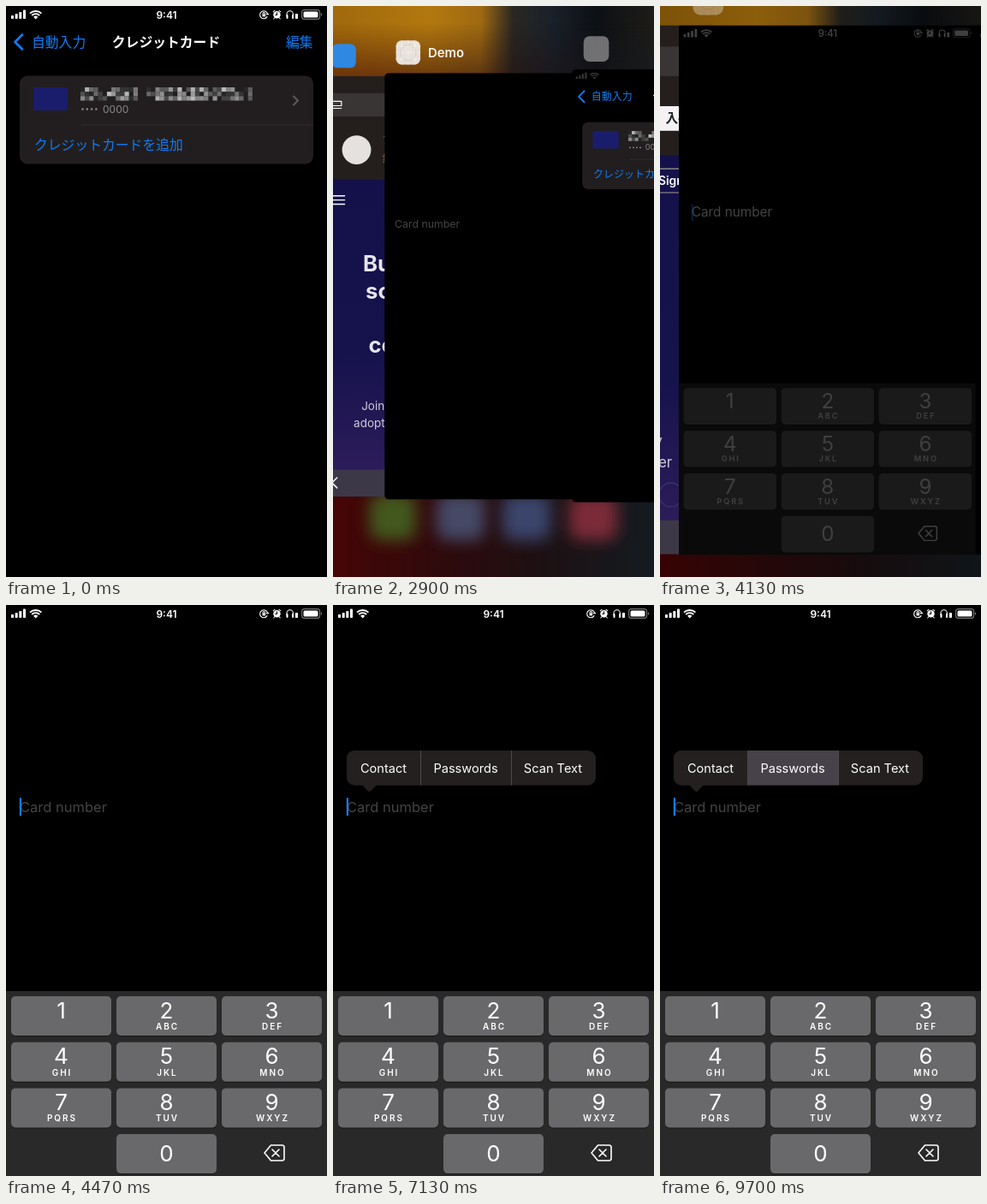
An HTML page that plays this animation: 375x667 px, repeating every 9.73 s.

```html
<!DOCTYPE html>
<html lang="ja">
<head>
<meta charset="utf-8">
<title>Card autofill</title>
<style>
  html, body { margin: 0; width: 100%; height: 100%; overflow: hidden; background: #000; }
  svg { display: block; width: 375px; height: 667px; }
  text { font-family: Inter, "Noto Sans CJK JP", "Noto Sans CJK", sans-serif; fill: #fff; }
  .mid { text-anchor: middle; }
  .jp { font-family: "Noto Sans CJK JP", "Noto Sans CJK", sans-serif; font-size: 15.8px; }
  .link { fill: #0f7cf5; }
  .digit { font-size: 26px; text-anchor: middle; }
  .abc { font-size: 10px; font-weight: 600; letter-spacing: 2px; text-anchor: middle; }
  .head { font-size: 35px; font-weight: 700; text-anchor: middle; fill: #e6e4ec; }
  .lead { font-size: 18.3px; text-anchor: middle; fill: #d0cdd8; }
  .menu text { font-size: 14.6px; text-anchor: middle; }
  .line { fill: none; stroke: #fff; stroke-linecap: round; stroke-linejoin: round; }
</style>
</head>
<body>
<svg viewBox="0 0 375 667">
  <defs>
    <linearGradient id="sky">
      <stop offset="0" stop-color="#a0690c"/><stop offset=".3" stop-color="#b2780f"/>
      <stop offset=".46" stop-color="#a06a12"/><stop offset=".56" stop-color="#2a2722"/>
      <stop offset=".68" stop-color="#1a212a"/><stop offset=".82" stop-color="#0d1014"/>
      <stop offset="1" stop-color="#1e1c19"/>
    </linearGradient>
    <linearGradient id="ground">
      <stop offset="0" stop-color="#460506"/><stop offset=".35" stop-color="#2e0a0c"/>
      <stop offset=".65" stop-color="#1d1013"/><stop offset="1" stop-color="#141b20"/>
    </linearGradient>
    <linearGradient id="fade" x2="0" y2="1">
      <stop offset=".03" stop-color="#fff" stop-opacity="0"/>
      <stop offset=".2" stop-color="#fff"/>
    </linearGradient>
    <mask id="lower"><rect width="375" height="667" fill="url(#fade)"/></mask>
    <linearGradient id="page" x2="0" y2="1">
      <stop offset="0" stop-color="#14114a"/><stop offset=".6" stop-color="#15124c"/>
      <stop offset="1" stop-color="#2c1c5a"/>
    </linearGradient>
    <filter id="blur" x="-50%" y="-50%" width="200%" height="200%"><feGaussianBlur stdDeviation="9"/></filter>
    <clipPath id="round"><rect id="corner" width="375" height="667"/></clipPath>
    <g id="status">
      <g fill="#fff">
        <rect x="6" y="11" width="3" height="4" rx=".8"/><rect x="10.7" y="9" width="3" height="6" rx=".8"/>
        <rect x="15.3" y="7" width="3" height="8" rx=".8"/><rect x="20" y="4.6" width="3" height="10.4" rx=".8"/>
        <path d="M34.7 15.4l-2.6-2.7a3.7 3.7 0 0 1 5.2 0z"/>
        <circle cx="316.500" cy="10.300" r="4.200"/>
        <rect x="338" y="9" width="3" height="6" rx=".8"/>
        <rect x="347.500" y="6.500" width="17" height="7" rx="1.600"/>
        <path d="M368.300 8.300q1.600 1.700 0 3.400z"/>
      </g>
      <g class="line" stroke-width="1.900" style="stroke-linecap:butt">
        <path d="M28 8.700a9.500 9.500 0 0 1 13.400 0M30.200 11a6.400 6.400 0 0 1 9 0"/>
      </g>
      <g class="line" stroke-width="1.100">
        <path d="M305 12.600a4.500 4.500 0 1 1 .6-3.200M304.200 9.600h2.600"/>
        <rect x="299.500" y="9.600" width="3.600" height="2.800" fill="#fff" stroke="none"/>
        <path d="M300.200 9.600v-1a1.100 1.100 0 0 1 2.200 0v1"/>
        <path d="M312.300 6.700l1.700-1.400M320.700 6.700l-1.700-1.400M313.600 14l-.8 1M319.400 14l.8 1"/>
        <path d="M316.500 7.800v2.700h-1.700" stroke="#000"/>
        <path d="M328 12V9.500a3.700 3.700 0 0 1 7.400 0V12"/>
        <path d="M328.500 11v3M335 11v3" stroke-width="2"/>
        <rect x="345.600" y="4.600" width="21" height="10.800" rx="3" stroke="#777"/>
      </g>
      <text class="mid" x="187.500" y="14.500" font-size="12" font-weight="600">9:41</text>
    </g>
  </defs>

  <g id="home">
    <rect width="375" height="667" fill="url(#sky)"/>
    <rect width="375" height="667" fill="url(#ground)" mask="url(#lower)"/>
    <g filter="url(#blur)">
      <rect x="43" y="570" width="54" height="54" rx="13" fill="#43591f"/>
      <rect x="121" y="570" width="56" height="54" rx="13" fill="#444a66"/>
      <rect x="198" y="570" width="56" height="54" rx="13" fill="#3b446c"/>
      <rect x="276" y="570" width="56" height="54" rx="13" fill="#7c2a38"/>
    </g>
  </g>

  <g id="browser">
    <rect class="icon" x="18" y="-51" width="38" height="38" rx="9" fill="#2a8df0"/>
    <g clip-path="url(#round)">
      <rect width="375" height="667" fill="#241f1d"/>
      <rect y="27" width="375" height="37" fill="#3a3535"/>
      <path class="line" d="M20 40h13v7h-13M20 51h13" stroke="#bbb" stroke-width="1.600"/>
      <circle cx="57" cy="117" r="23" fill="#e4e1de"/>
      <text class="jp" x="98" y="107" style="fill:#9a7a3a">アプリを開く</text>
      <text class="jp" x="98" y="136" style="fill:#9a7a3a">無料</text>
      <rect x="286" y="102" width="70" height="31" fill="#f4f2f4"/>
      <text class="jp mid" x="329" y="123" font-weight="700" style="fill:#222">入手</text>
      <rect y="164" width="375" height="460" fill="url(#page)"/>
      <path class="line" d="M20 190h18M20 196.500h18M20 203h18" stroke-width="2"/>
      <rect x="294" y="181" width="68" height="30" rx="5" fill="none" stroke="#a59c8c" stroke-width="1.300"/>
      <text x="304" y="201" font-size="15" font-weight="600">Sign up</text>
      <text class="head" x="187" y="310">Build and ship</text>
      <text class="head" x="187" y="353">software on a</text>
      <text class="head" x="187" y="396">single,</text>
      <text class="head" x="187" y="439">collaborative</text>
      <text class="lead" x="187" y="530">Join the world’s most widely</text>
      <text class="lead" x="187" y="557">adopted AI-powered developer</text>
      <circle cx="320" cy="592" r="15" fill="none" stroke="#3b3768" stroke-width="1.300"/>
      <rect y="624" width="375" height="43" fill="#3d3848"/>
      <path class="line" d="M26 637l-8 8 8 8" stroke="#6d6878" stroke-width="2"/>
    </g>
  </g>

  <g id="demo">
    <g class="icon">
      <rect x="18" y="-51" width="38" height="38" rx="9" fill="#eeeae8"/>
      <path class="line" d="M18 -42h38M18 -32h38M18 -22h38M27 -51v38M37 -51v38M47 -51v38M22 -47l30 30M52 -47l-30 30" stroke="#c4c0c0" stroke-width=".7"/>
      <circle cx="37" cy="-32" r="12" fill="none" stroke="#c4c0c0" stroke-width=".7"/>
      <text x="68" y="-25" font-size="20" font-weight="600">Demo</text>
    </g>
    <g clip-path="url(#round)">
      <rect width="375" height="667"/>
      <text x="16" y="241.500" font-size="16.500" style="fill:#444345">Card number</text>
      <g id="live">
        <use href="#status"/>
        <rect id="caret" x="15.800" y="225" width="2.200" height="21.500" rx="1" fill="#167cf4"/>
        <rect y="451" width="375" height="216" fill="#2a2929"/>
        <g id="keys"></g>
        <path class="line" d="M309.500 631h13a2.500 2.500 0 0 1 2.500 2.500v13a2.500 2.500 0 0 1-2.500 2.500h-13l-7.500-9zM311 636l8 8M319 636l-8 8" stroke-width="1.600"/>
      </g>
      <g class="menu" id="single">
        <path d="M34 210h17l-6.500 7q-2 2-4 0z"/>
        <rect x="16" y="170" width="83" height="40.500" rx="9"/>
        <text x="57.500" y="196">AutoFill</text>
      </g>
      <g class="menu" id="triple">
        <path id="tip" d="M34 210h17l-6.500 7q-2 2-4 0z"/>
        <rect x="16" y="170" width="291" height="40.500" rx="9" fill="#23201f"/>
        <path id="contact" d="M25 170h77.500v40.500h-77.500a9 9 0 0 1-9-9v-22.500a9 9 0 0 1 9-9z"/>
        <rect id="passwords" x="102.500" y="170" width="106" height="40.500"/>
        <path d="M102.500 170v40.500M208.500 170v40.500" stroke="#4b494c"/>
        <text x="59" y="196">Contact</text>
        <text x="155" y="196">Passwords</text>
        <text x="257" y="196">Scan Text</text>
      </g>
    </g>
  </g>

  <g id="settings">
    <rect class="icon" x="18" y="-51" width="39" height="39" rx="9" fill="#77767a"/>
    <g clip-path="url(#round)">
      <rect width="375" height="667"/>
      <use id="bar" href="#status"/>
      <path class="line" d="M19 33.500l-8.500 8.500 8.500 8.500" style="stroke:#0f7cf5" stroke-width="2.600"/>
      <text class="jp link" x="30" y="47.500">自動入力</text>
      <text class="jp mid" x="187" y="47.500" font-weight="700">クレジットカード</text>
      <text class="jp link" x="327" y="47.500">編集</text>
      <rect x="16" y="81.500" width="343" height="103" rx="9" fill="#221e1f"/>
      <path d="M88 139h271" stroke="#302c2c"/>
      <rect x="32" y="95" width="40" height="27" rx="2" fill="#191d6c"/>
      <g id="mosaic"></g>
      <path class="line" d="M89.500 120.500h16.500" style="stroke:#8b898c" stroke-width="2.600" stroke-dasharray="0 5.300"/>
      <text x="113" y="124.500" font-size="12" style="fill:#8b898c">0000</text>
      <path class="line" d="M336 105.500l5 5-5 5" style="stroke:#5c5a5d" stroke-width="2"/>
      <text class="jp link" x="33" y="168">クレジットカードを追加</text>
    </g>
  </g>
</svg>
<script>
const LOOP = 9730, IDLE = '#23201f', PRESSED = '#474149';
const $ = id => document.getElementById(id);
const ramp = (t, from, span) => Math.min(1, Math.max(0, (t - from) / span));
const mix = (a, b, p) => a.map((v, i) => v + (b[i] - v) * p);
const smooth = p => p * p * (3 - 2 * p);

$('keys').innerHTML = ['', 'ABC', 'DEF', 'GHI', 'JKL', 'MNO', 'PQRS', 'TUV', 'WXYZ', null, ''].map((abc, i) => {
  if (abc === null) return '';
  const x = 6 + i % 3 * 123, y = 457 + Math.floor(i / 3) * 53.700, last = i > 9;
  return `<rect x="${x}" y="${y + 1}" width="117" height="46" rx="5" fill="#161516"/>
    <rect x="${x}" y="${y}" width="117" height="46" rx="5" fill="#69686a"/>
    <text class="digit" x="${x + 58.500}" y="${y + (last ? 31.500 : 25.500)}">${last ? 0 : i + 1}</text>
    <text class="abc" x="${x + 59.500}" y="${y + 39}">${abc}</text>`;
}).join('');

// Redacted cardholder line
let seed = 29;
const random = () => (seed = seed * 16807 % 2147483647) / 2147483647;
let cells = '';
for (let row = 0; row < 3; row++) {
  for (let col = 0; col < 39; col++) {
    const gap = col > 12 && col < 15;
    const tone = Math.round(35 + 155 * random());
    if (gap || random() < .22) continue;
    cells += `<rect x="${87 + col * 5.150}" y="${95 + row * 5.150}" width="5.200" height="5.200" fill="rgb(${tone},${tone},${tone})"/>`;
  }
}
$('mosaic').innerHTML = cells;

// Poses are [x, y, scale] when entering, in the switcher, and after opening
const cards = {
  browser: [[-80, 110, .700], [-10, 80, .739], [-391, 0, 1]],
  demo: [[-203, 52, .820], [78, 80, .742], [0, 0, 1]],
  settings: [[0, 0, 1], [298, 79, .742], [396, 0, 1]]
};

function caretAlpha(t) {
  if (t < 4810) return 1;
  const phase = (t - 4810) % 830;
  return 1 - smooth(ramp(phase, 0, 150)) + smooth(ramp(phase, 390, 180));
}

function draw(t) {
  const enter = 1 - (1 - ramp(t, 2670, 545)) ** 5;
  const open = 1 - (1 - ramp(t, 3840, 620)) ** 2;
  for (const id in cards) {
    const [start, rest, end] = cards[id];
    const [x, y, s] = open ? mix(rest, end, open) : mix(start, rest, enter);
    $(id).setAttribute('transform', `translate(${x} ${y}) scale(${s})`);
    $(id).querySelector('.icon').setAttribute('opacity', enter * (1 - open * .9));
  }
  $('home').setAttribute('opacity', 1 - open * .3);
  $('corner').setAttribute('rx', 7 * enter * (1 - open));
  $('bar').setAttribute('opacity', 1 - enter * .85);
  $('live').setAttribute('opacity', ramp(t, 4050, 330));
  $('caret').setAttribute('opacity', caretAlpha(t));

  const swap = smooth(ramp(t, 6730, 180));
  $('single').setAttribute('opacity', smooth(ramp(t, 5680, 200)) * (1 - swap));
  $('single').setAttribute('fill', t < 6300 ? IDLE : PRESSED);
  $('triple').setAttribute('opacity', swap);
  const onContact = t >= 7770 && t < 8970;
  $('contact').setAttribute('fill', onContact ? PRESSED : IDLE);
  $('tip').setAttribute('fill', onContact ? PRESSED : IDLE);
  $('passwords').setAttribute('fill', t >= 8970 ? PRESSED : IDLE);
}

const began = performance.now();
function tick() {
  draw((performance.now() - began) % LOOP);
  requestAnimationFrame(tick);
}
tick();
</script>
</body>
</html>
```
